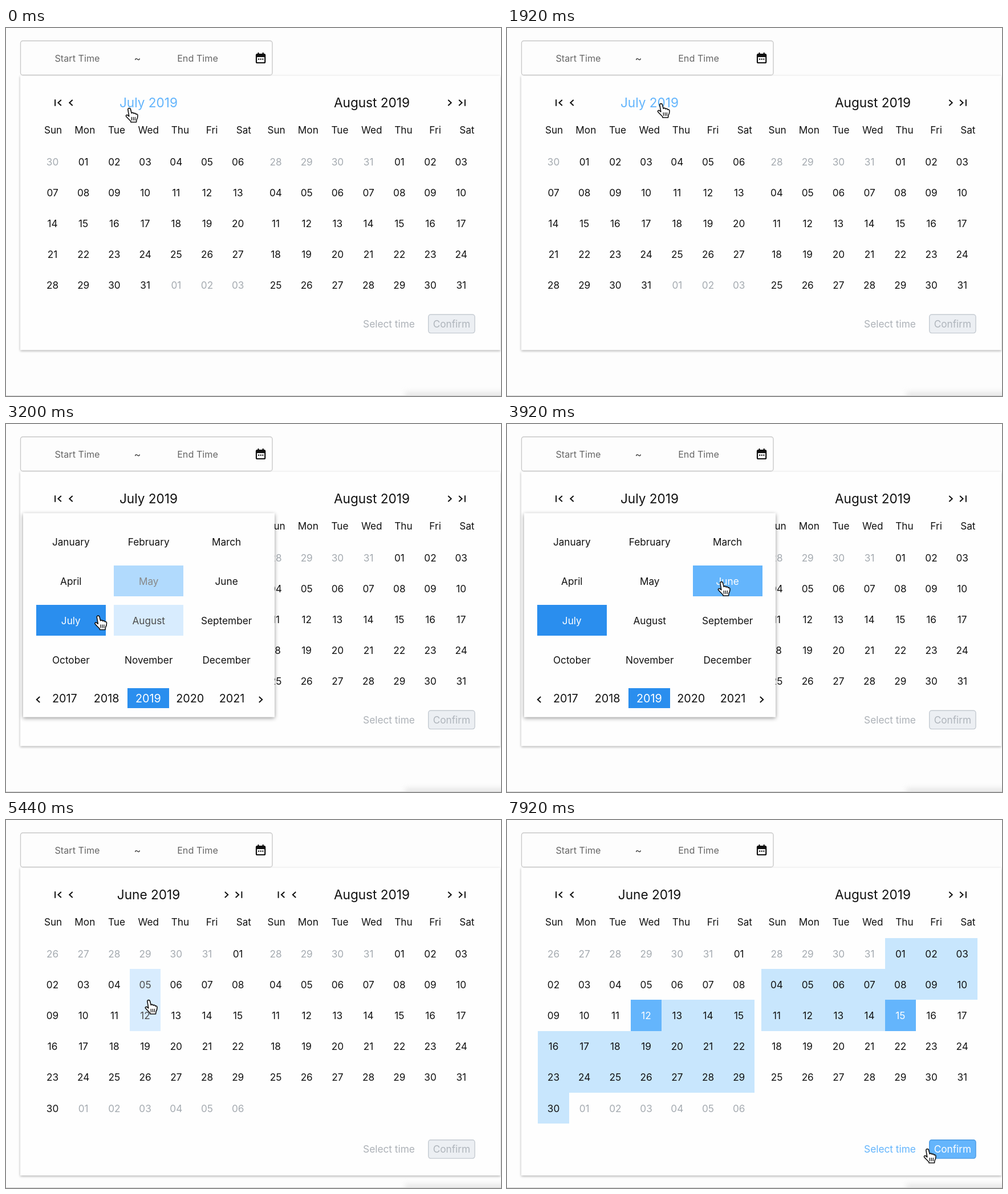
An HTML page that plays this animation: 868 by 645 pixels, repeating every 8000 ms.

```html
<!DOCTYPE html>
<html lang="en">
<head>
<meta charset="utf-8">
<title>Date range picker</title>
<style>
  html, body { margin: 0; width: 100%; height: 100%; overflow: hidden; background: #fdfdfd; }
  svg { display: block; width: 868px; height: 645px; }
  text { font-family: Inter, Roboto, sans-serif; text-anchor: middle; white-space: pre; }
</style>
</head>
<body>
<svg viewBox="0 0 868 645" xmlns="http://www.w3.org/2000/svg">
  <defs>
    <filter id="soft" x="-20%" y="-20%" width="140%" height="140%"><feGaussianBlur stdDeviation="2.2"/></filter>
    <filter id="haze" x="-20%" y="-200%" width="140%" height="500%"><feGaussianBlur stdDeviation="5"/></filter>
    <filter id="lift" x="-5%" y="-5%" width="110%" height="110%">
      <feDropShadow dx="0" dy="2" stdDeviation="3.5" flood-color="#000" flood-opacity=".42"/>
    </filter>
  </defs>
  <g id="scene"></g>
</svg>
<script>
const LOOP = 8000, STEP = 80;
const PREV_CLICK = 720, NEXT_CLICK = 1440, OPEN = 2080, PICK = 4080, CLOSE = 5040;
const START_CLICK = 5840, END_CLICK = 6560, READY = 7120;

const WHITE = [254, 254, 254], BLACK = [17, 17, 17], GREY = [164, 170, 176];
const SKY = [100, 181, 252], PALE = [200, 230, 253], BLUE = [42, 142, 238];

const MONTHS = ['January', 'February', 'March', 'April', 'May', 'June', 'July',
  'August', 'September', 'October', 'November', 'December'];
const WEEK = ['Sun', 'Mon', 'Tue', 'Wed', 'Thu', 'Fri', 'Sat'];
const JUNE = { name: 'June', index: 5, lead: 6, before: 31, days: 30, rows: 6 };
const JULY = { name: 'July', index: 6, lead: 1, before: 30, days: 31, rows: 5 };
const AUGUST = { name: 'August', index: 7, lead: 4, before: 31, days: 31, rows: 5 };

const CELL = 54.2, TOP = 207, LEFT = 54.4, SHIFT = 391.5;
const RANGE_START = 17, RANGE_END = 60;

// Pointer tip: time, x, y
const PATH = [
  [0, 217, 141], [160, 198, 146], [560, 113, 131], [720, 113, 131],
  [1280, 386, 131], [1440, 386, 131], [1680, 290, 135], [1920, 271, 133],
  [2080, 271, 133], [2400, 252, 195], [2640, 246, 239], [2880, 248, 264],
  [2960, 248, 278], [3120, 225, 328], [3280, 100, 345], [3440, 140, 345],
  [3600, 270, 320], [3680, 345, 290], [3760, 377, 277], [4080, 377, 277],
  [4640, 256, 136], [4720, 252, 133], [5200, 252, 133], [5280, 252, 205],
  [5360, 252, 290], [5440, 251, 316], [5680, 248, 338], [5840, 248, 338],
  [6320, 676, 352], [6560, 696, 361], [7120, 696, 361], [7680, 771, 569],
  [7760, 771, 569], [7920, 738, 577]
];

const mix = (a, b, k) => a.map((v, i) => v + (b[i] - v) * k);
const css = c => `rgb(${c.map(Math.round)})`;
const inside = ([px, py], x, y, w, h) => px >= x && px < x + w && py >= y && py < y + h;

function tipAt(t) {
  const i = PATH.findIndex(key => key[0] > t);
  if (i < 0) return PATH[PATH.length - 1].slice(1);
  const [t0, x0, y0] = PATH[i - 1], [t1, x1, y1] = PATH[i];
  const k = (t - t0) / (t1 - t0);
  return [x0 + (x1 - x0) * k, y0 + (y1 - y0) * k];
}

// Fades are the mean of a value over the last few steps.
function fade(t, count, value) {
  let sum = 0;
  for (let i = 0; i < count; i++) sum += Number(value(Math.max(0, t - i * STEP)));
  return sum / count;
}

const isOpen = t => t >= OPEN && t < CLOSE;
const leftMonth = t => (t >= PREV_CLICK && t < NEXT_CLICK) || t >= PICK ? JUNE : JULY;

const label = (str, x, y, size, fill = '#111') =>
  `<text x="${x}" y="${y + size * .364}" font-size="${size}" fill="${fill}">${str}</text>`;
const box = (x, y, w, h, fill, more = '') =>
  `<rect x="${x}" y="${y}" width="${w}" height="${h}" fill="${fill}" ${more}/>`;
const crisp = 'shape-rendering="crispEdges"';

function chevron(x, y, dir, color, bar = false) {
  const d = 2.7 * dir;
  const stop = bar ? `M${x - 4.3 * dir - d * .4} ${y - 5.7}v11.4` : '';
  const cx = bar ? x + 2.6 * dir : x;
  return `<path d="M${cx + d} ${y - 5}L${cx - d} ${y}L${cx + d} ${y + 5}${stop}"
    fill="none" stroke="${color}" stroke-width="2"/>`;
}

function navButton(t, x, dir, bar) {
  const hover = fade(t, 2, s => inside(tipAt(s), x - 9, 120, 18, 22));
  return chevron(x, 131, dir, css(mix(BLACK, SKY, hover)), bar);
}

const enabled = (month, slot) => slot >= month.lead && slot < month.lead + month.days;

function hoveredDay(t) {
  const [x, y] = tipAt(t);
  const side = x > 440 ? 1 : 0;
  const col = Math.min(6, Math.max(0, Math.floor((x - LEFT - side * SHIFT) / CELL)));
  const row = Math.floor((y - TOP) / CELL);
  const month = side ? AUGUST : leftMonth(t);
  if (isOpen(t) || row < 0 || row >= month.rows || !enabled(month, row * 7 + col)) return -1;
  return side * 42 + row * 7 + col;
}

function dayColors(t, id) {
  let bg = [0, 0, 0], strong = 0;
  const taps = 4;
  for (let i = 0; i < taps; i++) {
    const s = t - i * STEP;
    const end = s >= END_CLICK ? RANGE_END : hoveredDay(Math.max(0, s));
    const ranged = s >= START_CLICK;
    const edge = id === end || (ranged && id === RANGE_START);
    const between = ranged && id > RANGE_START && id < end;
    const color = edge ? SKY : between ? PALE : WHITE;
    bg = bg.map((v, k) => v + color[k] / taps);
    strong += edge / taps;
  }
  return { bg, ink: mix(BLACK, [255, 255, 255], strong) };
}

function calendar(t, month, side) {
  const dx = side * SHIFT;
  const titleX = side ? 641.5 : 250;
  const hover = fade(t, 2, s => inside(tipAt(s), titleX - 56, 118, 112, 32));
  let out = label(`${month.name} 2019`, titleX, 131, 22.6, css(mix(BLACK, SKY, hover)));
  const gap = leftMonth(t) === JUNE && t < START_CLICK;
  if (!side || gap) out += navButton(t, 91.5 + dx, 1, true) + navButton(t, 114 + dx, 1);
  if (side || gap) out += navButton(t, 386.5 + dx, -1) + navButton(t, 408 + dx, -1, true);
  WEEK.forEach((day, i) => out += label(day, 82.6 + dx + i * 55.7, 178.5, 17.2));

  let cells = '', numbers = '';
  for (let slot = 0; slot < month.rows * 7; slot++) {
    const col = slot % 7, row = Math.floor(slot / 7);
    const x = LEFT + dx + col * CELL, y = TOP + row * CELL;
    const on = enabled(month, slot);
    let day = slot - month.lead + 1, ink = GREY;
    if (day < 1) day += month.before;
    else if (day > month.days) day -= month.days;
    if (on) {
      const colors = dayColors(t, side * 42 + slot);
      ink = colors.ink;
      if (colors.bg[0] < 253.5) cells += box(x, y, CELL, CELL, css(colors.bg), crisp);
    }
    numbers += label(String(day).padStart(2, '0'), x + CELL / 2, y + 27.3, 17.2, css(ink));
  }
  return out + cells + numbers;
}

function field() {
  let out = box(25.5, 22.5, 441.5, 60, '#fdfdfd', 'rx="4" stroke="#c6c6c6" stroke-width="1.3"');
  out += label('Start Time', 125, 53, 16.2, '#666') + label('~', 230.5, 53, 18, '#444');
  out += label('End Time', 336, 53, 16.2, '#666');
  out += box(439, 46, 15.2, 15, 'none', 'rx="1.5" stroke="#111" stroke-width="2.2"');
  out += box(439, 45.5, 15, 5.5, '#111');
  out += '<path d="M442.5 43v4M450.7 43v4" stroke="#111" stroke-width="2.2"/>';
  return out + [442, 445.6, 449.2].map(x => box(x, 53.5, 2.2, 2.2, '#111')).join('');
}

function panel(t) {
  const left = leftMonth(t);
  const extra = left.rows > 5 ? 58.5 : 0;
  const height = 481 + extra, footer = 518.5 + extra;
  const ready = fade(t, 2, s => s >= READY);
  const tone = (a, b) => css(mix(a, b, ready));
  return box(25, 85, 842, height, '#000', 'opacity=".3" filter="url(#soft)"')
    + box(25, 83.5, 842, height, css(WHITE))
    + calendar(t, left, 0) + calendar(t, AUGUST, 1)
    + label('Select time', 671.5, footer, 17.3, tone([172, 177, 183], SKY))
    + box(740.7, footer - 16.3, 81.3, 32.4, tone([236, 239, 243], SKY),
      `rx="4" stroke="${tone([196, 202, 209], [76, 155, 228])}" stroke-width="1.4"`)
    + label('Confirm', 781.3, footer, 17.2, tone([174, 180, 187], [255, 255, 255]));
}

function monthMenu(t) {
  const opacity = fade(t, 2, isOpen);
  if (!opacity) return '';
  let out = box(30, 156.5, 441, 357, '#fefefe', 'filter="url(#lift)"');
  const chosen = leftMonth(t).index;
  MONTHS.forEach((name, i) => {
    const x = 53 + (i % 3) * 136.4, y = 179 + Math.floor(i / 3) * 69;
    const hover = fade(t, 4, s => isOpen(s) && inside(tipAt(s), x - 7, y - 7, 136, 68));
    const picked = i === chosen && (i !== JUNE.index || t >= PICK);
    const fill = picked ? BLUE : mix(WHITE, SKY, hover);
    const ink = picked ? WHITE : mix(BLACK, WHITE, hover);
    if (picked || hover) out += box(x, y, 121.7, 54, css(fill), crisp);
    out += label(name, x + 60.8, y + 27.4, 17.2, css(ink));
  });
  out += box(212.5, 463, 73, 35, css(BLUE), crisp);
  for (let i = 0; i < 5; i++)
    out += label(2017 + i, 102.8 + i * 73.3, 481, 19.8, i === 2 ? '#fff' : '#111');
  out += chevron(56.5, 483, 1, '#111') + chevron(446.5, 483, -1, '#111');
  return `<g opacity="${opacity}">${out}</g>`;
}

function pointer(t) {
  const [x, y] = tipAt(t);
  return `<g transform="translate(${x} ${y})" stroke="#111" stroke-linejoin="round" stroke-linecap="round">
    <path fill="#fff" stroke-width="1.6" d="M-3.2 1.8C-3.4-.9 .8-1.2 1.5 1.5L3.2 8.2C4.5 6.8 6.8 7.2 7.2 9
      C8.5 7.8 10.6 8.4 10.9 10.2C12.3 9.4 13.9 10.2 14 12C14.2 15 13.5 17.5 12 20L11.5 24H2L1.5 22
      C-1 19.5-3.8 17-6.3 14C-7.5 12.3-5.3 10.6-3.6 11.9L-1.2 13.8Z"/>
    <path fill="none" stroke-width="1.3" d="M3.2 15.5l.3 5M6.3 15.5l.2 5M9.4 15.5l-.1 5"/>
  </g>`;
}

const scene = document.getElementById('scene');
const backdrop = box(0, 0, 868, 645, '#fdfdfd')
  + box(700, 638, 190, 12, '#dedede', 'opacity=".7" filter="url(#haze)"')
  + box(0, 644, 868, 1, '#d2d2d2');

function draw(t) {
  scene.innerHTML = backdrop + panel(t) + field() + monthMenu(t) + pointer(t);
}

const begin = performance.now();
let shown = -1;
function tick() {
  const elapsed = (performance.now() - begin) % LOOP;
  const t = Math.floor(elapsed / STEP) * STEP;
  if (t !== shown) draw(shown = t);
  requestAnimationFrame(tick);
}
tick();
</script>
</body>
</html>
```
